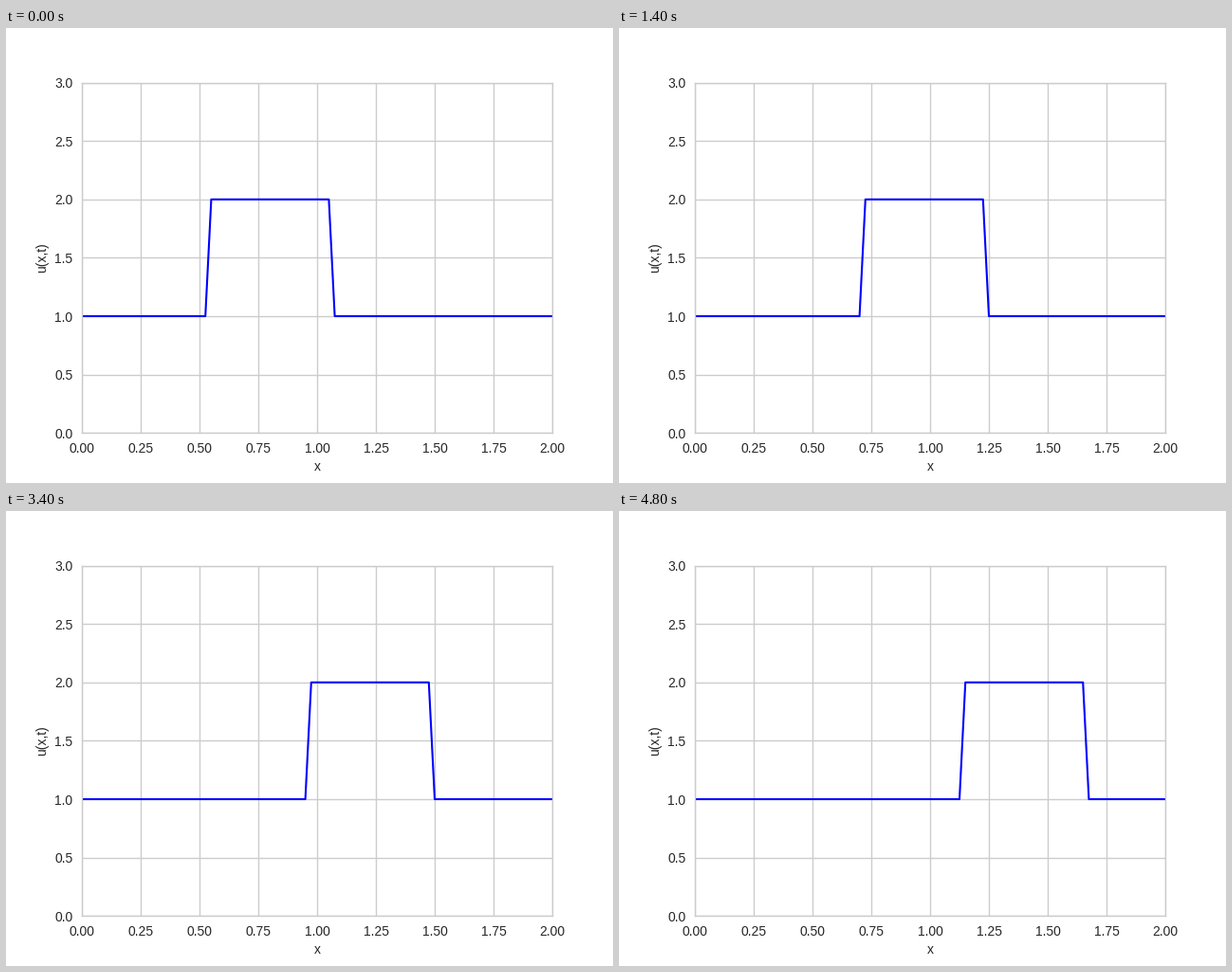
A matplotlib script that plays this animation: 640x480 px, repeating every 5 s.

```python
import numpy as np
import matplotlib.pyplot as plt
from matplotlib.animation import FuncAnimation

FRAMES, INTERVAL = 25, 200
NX, LENGTH = 81, 2.0
LEFT, RIGHT = 22, 42  # grid indices of the plateau at the start

plt.rcParams.update({
    "font.family": "Liberation Sans",
    "font.size": 10,
    "text.color": ".15",
    "axes.labelcolor": ".15",
    "axes.edgecolor": ".8",
    "axes.linewidth": 1,
    "axes.axisbelow": True,
    "axes.grid": True,
    "grid.color": ".8",
    "grid.linewidth": 1,
    "lines.solid_capstyle": "round",
})
for axis in ("xtick", "ytick"):
    plt.rcParams.update({
        f"{axis}.color": ".15",
        f"{axis}.major.size": 0,
        f"{axis}.major.pad": 7,
    })

fig = plt.figure(figsize=(6.4, 4.8), dpi=100)
ax = fig.add_axes([0.125, 0.11, 0.775, 0.77])
ax.set(xlim=(0, LENGTH), ylim=(0, 3), xlabel="x", ylabel="u(x,t)")

x = np.linspace(0, LENGTH, NX)
line, = ax.plot(x, np.ones(NX), color="b", lw=1.5)


def update(step):
    """Carry the square pulse one grid cell to the right per step."""
    u = np.ones(NX)
    u[LEFT + step:RIGHT + step + 1] = 2
    line.set_ydata(u)
    return line,


anim = FuncAnimation(fig, update, frames=FRAMES, interval=INTERVAL,
                     repeat=True, repeat_delay=0)
plt.show()
```
